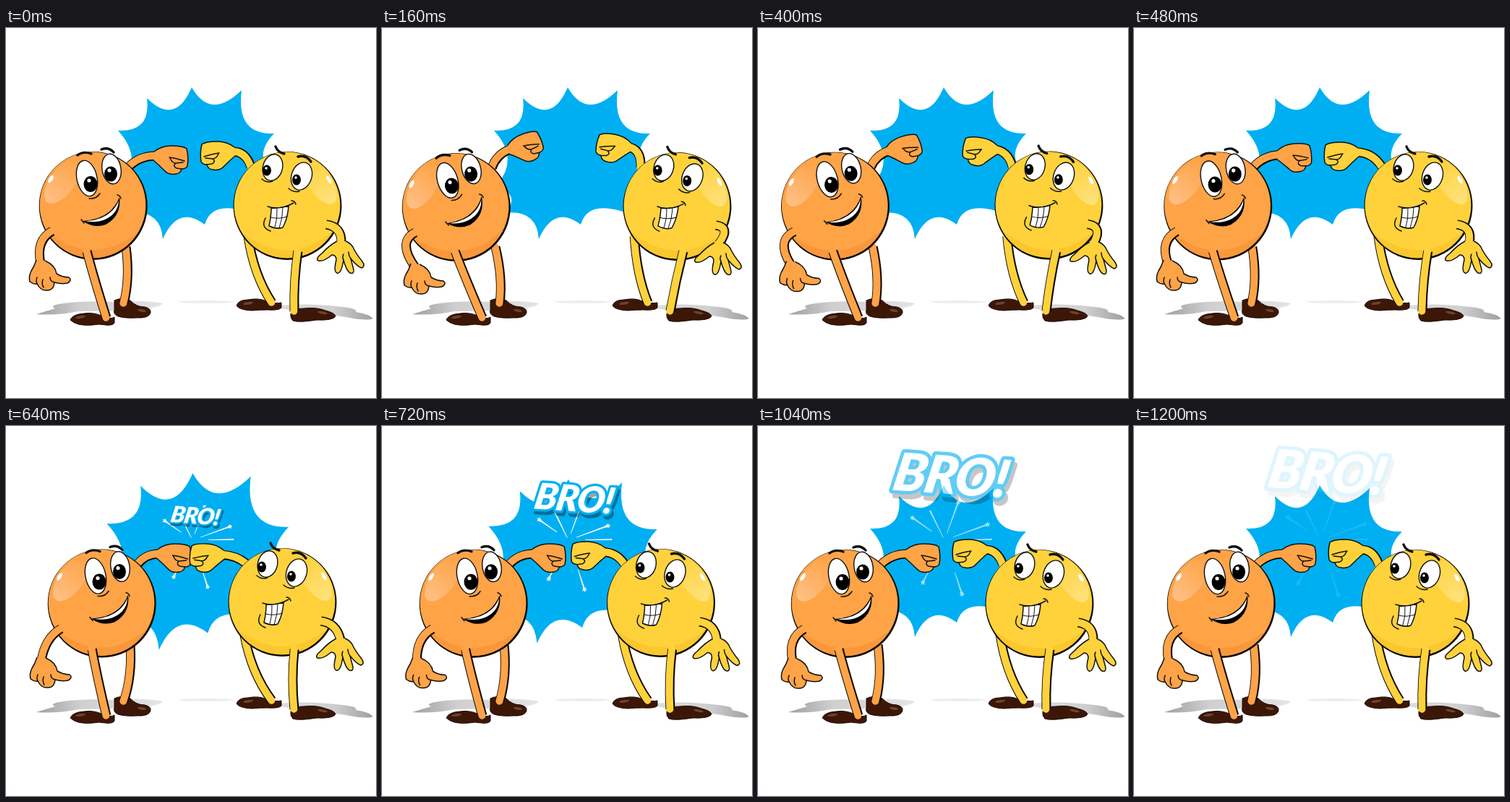
Write an HTML page that moves like this. It is 512 px wide and 512 px high and loops after 1.28 s.

```html
<!DOCTYPE html>
<html lang="en">
<head>
<meta charset="utf-8">
<title>Fist bump</title>
<style>
html, body { margin: 0; width: 100%; height: 100%; overflow: hidden; background: #fff; }
svg { display: block; width: 100vw; height: 100vh; }
.line { fill: none; stroke: #111; stroke-width: 1.5; stroke-linecap: round; stroke-linejoin: round; }
.ink { fill: none; stroke: #0d0905; stroke-width: 13; }
.tone { fill: none; stroke-width: 10; stroke-linecap: round; }
.skin { stroke: #111; stroke-width: 1.5; stroke-linejoin: round; }
.eye { fill: #fff; stroke: #111; stroke-width: 1.4; }
.shoe { fill: #3c1708; stroke: #1c0a03; stroke-width: 1; }
.shine { fill: #71432c; }
.brow { fill: none; stroke: #111; stroke-width: 3.4; stroke-linecap: round; }
#orange .skin { fill: #ffa347; }
#orange .tone { stroke: #ffa347; }
#yellow .skin { fill: #ffd23b; }
#yellow .tone { stroke: #ffd23b; }
#word text { font: italic 900 68px Lato, "Open Sans", sans-serif; letter-spacing: -2px; text-anchor: middle; stroke-linejoin: round; }
</style>
</head>
<body>
<svg viewBox="0 0 512 512">
  <defs>
    <linearGradient id="shadeL"><stop offset="0" stop-color="#9f9f9f"/><stop offset=".35" stop-color="#cfcfcf"/><stop offset="1" stop-color="#e4e4e4"/></linearGradient>
    <linearGradient id="shadeR"><stop offset="0" stop-color="#dedede"/><stop offset=".6" stop-color="#cecece"/><stop offset="1" stop-color="#9f9f9f"/></linearGradient>
    <linearGradient id="glowO"><stop offset="0" stop-color="#ffc085"/><stop offset="1" stop-color="#ffa347"/></linearGradient>
    <linearGradient id="glowY"><stop offset="0" stop-color="#ffd23b"/><stop offset="1" stop-color="#ffe27f"/></linearGradient>
  </defs>

  <path fill="url(#shadeL)" d="M42 396Q58 391 68 388Q58 384 80 381Q112 377 150 379Q195 376 217 381Q214 386 195 388Q150 392 100 392Q72 398 42 396Z"/>
  <ellipse cx="277" cy="379" rx="39" ry="2" fill="#ededed"/>
  <path fill="url(#shadeR)" d="M376 384Q420 380 465 386Q487 388 484 393Q503 396 508 402Q500 406 470 400Q430 394 376 388Z"/>

  <path id="burst" fill="#00aff2" d="M155 142Q201 144 195 97Q234 136 257 82Q283 128 326 86Q318 148 371 146Q340 178 372 205Q330 225 342 257Q285 236 275 272Q238 244 217 292Q214 250 168 256Q194 236 160 216Q190 180 155 142Z"/>
  <g id="sparks" fill="#fff"></g>

  <g id="orange">
    <path class="shoe" d="M150 377Q160 372 172 377Q180 386 192 386Q201 388 200 394Q198 402 180 401Q165 402 155 399Q148 396 150 390Z"/>
    <ellipse class="shine" cx="188" cy="391" rx="6" ry="1.8" transform="rotate(10 188 391)"/>
    <path class="shoe" d="M89 404Q92 396 108 395Q120 393 132 398Q145 404 150 400V408Q148 412 138 411Q128 409 120 411Q98 413 89 404Z"/>
    <ellipse class="shine" cx="103" cy="400" rx="7" ry="1.8" transform="rotate(-9 103 400)"/>
    <g class="limb back"></g>
    <g class="limb reach"></g>
    <g class="fist"></g>
    <g class="body">
      <circle cx=".7" cy="1" r="75" fill="#0d0905"/>
      <circle r="73.4" fill="#ffa347"/>
      <path fill="#f9973c" d="M-62 38Q0 86 62 38Q40 73 0 73Q-40 73 -62 38Z"/>
      <ellipse cx="-42" cy="-32" rx="35" ry="17" transform="rotate(-53 -42 -32)" fill="url(#glowO)"/>
      <ellipse cx="-58" cy="-36" rx="6" ry="2.6" transform="rotate(-58 -58 -36)" fill="#fff"/>
      <ellipse class="eye" cx="-8" cy="-37" rx="14" ry="25" transform="rotate(-12 -8 -37)"/>
      <ellipse class="eye" cx="26" cy="-50" rx="13" ry="21" transform="rotate(-10 26 -50)"/>
      <ellipse cx="-3" cy="-29" rx="9.5" ry="11"/>
      <ellipse cx="25" cy="-43" rx="9" ry="10.5"/>
      <circle cx="-5" cy="-34" r="2.6" fill="#fff"/>
      <circle cx="23" cy="-48" r="2.6" fill="#fff"/>
      <path class="line" d="M-5 -9Q5 -8 10 -16M-16 20L-12 25M34 -14Q38 -13 39 -9"/>
      <path class="brow" d="M-21 -69Q-13 -75 -2 -71M12 -77Q22 -81 29 -73"/>
      <path d="M-14 22Q25 20 37 -11Q40 15 18 27Q2 33 -14 22Z"/>
      <path fill="#fff" d="M-10 22.500Q25 20 36 -6Q35 12 17 20Q5 25 -10 22.500Z"/>
    </g>
    <g class="limb front"></g>
    <g class="limb rest"></g>
    <g class="hand">
      <path class="skin" d="M42 321Q39 330 35 336Q31 344 33 351Q38 355 43 354Q48 364 57 363Q66 363 67 352Q77 355 85 353Q92 349 87 345Q78 345 70 340Q68 328 54 322"/>
      <path class="line" d="M43 354Q41 350 43 345M52 359Q49 354 51 348M67 352Q61 351 61 345"/>
    </g>
  </g>

  <g id="yellow">
    <path class="shoe" d="M319 384Q322 376 335 376Q350 373 360 378Q375 382 381 380V387Q378 391 362 390Q350 390 340 391Q322 390 319 384Z"/>
    <ellipse class="shine" cx="335" cy="381" rx="7" ry="1.8" transform="rotate(-8 335 381)"/>
    <path class="shoe" d="M394 395Q398 388 412 388Q430 386 442 391Q455 394 456 399Q452 405 430 404Q405 408 397 405Q393 401 394 395Z"/>
    <ellipse class="shine" cx="438" cy="394" rx="7" ry="1.8" transform="rotate(12 438 394)"/>
    <g class="limb back"></g>
    <g class="limb reach"></g>
    <g class="fist"></g>
    <g class="body">
      <circle cx=".5" cy="1" r="75" fill="#0d0905"/>
      <circle r="73.400" fill="#ffd23b"/>
      <path fill="#fac72f" d="M-62 38Q0 86 62 38Q40 73 0 73Q-40 73 -62 38Z"/>
      <ellipse cx="46" cy="-31" rx="34" ry="16" transform="rotate(57 46 -31)" fill="url(#glowY)"/>
      <ellipse cx="58" cy="-35" rx="6" ry="2.400" transform="rotate(60 58 -35)" fill="#fff"/>
      <ellipse class="eye" cx="-20" cy="-52" rx="13.500" ry="18.500" transform="rotate(15 -20 -52)"/>
      <ellipse class="eye" cx="20" cy="-40" rx="14" ry="19.500" transform="rotate(18 20 -40)"/>
      <ellipse cx="-28" cy="-48" rx="6" ry="7.500"/>
      <ellipse cx="13" cy="-35" rx="6" ry="7.500"/>
      <circle cx="-29" cy="-51" r="1.800" fill="#fff"/>
      <circle cx="12" cy="-38" r="1.800" fill="#fff"/>
      <path class="line" d="M-35 -36Q-28 -30 -20 -33M2 -23Q9 -17 17 -19M-30 18Q-37 31 -23 36"/>
      <path class="brow" d="M-16 -81Q-13 -73 -4 -71M15 -67Q26 -70 33 -60"/>
      <path class="line" d="M-27 2Q-10 8 9 -3M6 -6Q11 -6 12 -1"/>
      <path fill="#fff" stroke="#111" stroke-width="1.500" stroke-linejoin="round" d="M-22 4Q-10 5 2 1Q1 18 -6 31Q-14 34 -25 29Q-22 17 -22 4Z"/>
      <path class="line" style="stroke-width:1" d="M-14 5Q-13 18 -17 31M-6 4Q-6 18 -11 32M-23 17Q-11 20 0 16"/>
    </g>
    <g class="limb front"></g>
    <g class="limb rest"></g>
    <g class="hand">
      <path class="skin" d="M458 295Q447 301 437 312Q428 319 432 322Q439 324 451 314Q457 314 457 321Q453 337 458 339Q464 341 467 321Q471 336 476 339Q482 341 481 334L477 319Q486 330 492 332Q498 330 493 323Q484 312 480 303Q476 297 470 295"/>
      <path class="line" d="M467 321Q465 317 467 313M477 319Q474 315 474 310"/>
    </g>
  </g>

  <g id="word">
    <text x="5" y="31" opacity=".36" stroke="#000" stroke-width="8">BRO!</text>
    <text y="24.500" fill="#fff" stroke="#00aff2" stroke-width="9" paint-order="stroke">BRO!</text>
  </g>
</svg>
<script>
const STEP = 80, COUNT = 16;
const $ = (sel, root = document) => root.querySelector(sel);
const set = (el, name, value) => el.setAttribute(name, value);

// body x, y, turn; fist x, y, turn; resting hand dx, dy; one row per two steps
const poses = {
  orange: [
    [120, 245, 0, 229, 183, 0, 0, 0],
    [102, 247, -5, 200, 166, -20, -2, 5],
    [97, 246, -6, 185, 159, -30, -4, 3],
    [115.5, 245.5, -1, 223, 180, -4, -1, 0],
    [132, 244.5, 0, 233.5, 183, 0, 1, -1]
  ],
  yellow: [
    [389, 245, 0, 292, 177, 0, 0, 0],
    [408, 246, 2, 319, 167, 10, 2, 2],
    [411, 244, 3, 326, 165, 15, 2, 2],
    [393, 245, 0, 286, 178, 0, 0, 0],
    [382, 243, 0, 277, 183, 3, -1, -1]
  ]
};
const swell = { 7: 1.05, 8: 1.165, 9: 1.08 };
// step: word x, y, scale, opacity, spark scale
const pops = {
  8: [262, 124, .46, 1, .92],
  9: [266, 100, .74, 1, .97],
  10: [267, 77, 1, 1, 1],
  11: [267, 73, 1.03, 1, 1.02],
  12: [267, 70, 1.05, .85, 1.04],
  13: [267, 68, 1.07, .62, 1.06],
  14: [267, 66, 1.08, .37, 1.07],
  15: [267, 64, 1.09, .12, 1.08]
};
// angle, inner and outer radius, star at the tip
const rays = [
  [-145, 20, 51, 1], [-116, 4, 43, 0], [-70, 10, 53, 1], [-20, 12, 60, 1],
  [-1, 24, 62, 0], [117, 46, 62, 1], [72, 44, 74, 1]
];

const fistArt = `<path class="skin" d="M-24 -12Q-14 -20 0 -20Q16 -20 21 -16Q24 -4 22 8Q20 12 14 12Q13 18 6 19Q-4 21 -10 14Q-18 6 -25 0"/>
  <path class="line" d="M-3 -4Q6 -3 18 1M-2 -3Q1 4 6 4L16 3M6 4Q1 8 7 11L14 12"/>`;
document.querySelectorAll(".fist").forEach(g => g.innerHTML = fistArt);
document.querySelectorAll(".limb").forEach(g =>
  g.innerHTML = '<path class="ink"/><path class="tone" transform="translate(-.6 -.3)"/>');

function star(x, y, r) {
  const pts = [...Array(10).keys()].map(i => {
    const a = i * Math.PI / 5 - 1.2, q = i % 2 ? r * .45 : r;
    return `${x + q * Math.cos(a)},${y + q * Math.sin(a)}`;
  });
  return `<polygon points="${pts.join(" ")}"/>`;
}
$("#sparks").innerHTML = rays.map(([deg, a, b, tip]) =>
  `<g transform="rotate(${deg})"><path d="M${a} -.4L${b} -1.1V1.1L${a} .4Z"/>${tip ? star(b, 0, 4) : ""}</g>`).join("");

function poseAt(rows, step) {
  const row = i => rows[i] || rows[0];
  const i = step >> 1, k = step % 2 / 2;
  return row(i).map((v, n) => v + (row(i + 1)[n] - v) * k);
}

function limb(root, name, from, bend, to) {
  const d = `M${from}Q${bend}  ${to}`;
  for (const path of $(".limb." + name, root).children) set(path, "d", d);
}

function drawPal(id, step) {
  const root = $("#" + id), left = id === "orange", side = left ? 1 : -1;
  const [x, y, turn, fx, fy, ft, hx, hy] = poseAt(poses[id], step);
  set($(".body", root), "transform", `translate(${x} ${y}) rotate(${turn})`);
  set($(".fist", root), "transform", `translate(${fx} ${fy}) rotate(${ft}) scale(${side} 1)`);
  set($(".hand", root), "transform", `translate(${hx} ${hy})`);

  const a = ft * Math.PI / 180, c = Math.cos(a), s = Math.sin(a);
  const wx = fx - 22 * side * c + 6 * s, wy = fy - 22 * side * s - 6 * c;
  const sx = x + 50 * side, sy = y - 53;
  const reach = Math.hypot(wx - sx, wy - sy) * .55 * side;
  limb(root, "reach", [sx, sy], [wx - reach * c, wy - reach * s], [wx, wy]);

  if (left) {
    const d = x - 120;
    limb(root, "back", [166 + d * .5, 303], [172 + d * .25, 346], [163, 381]);
    limb(root, "front", [112 + d * .6, 309], [122 + d * .35, 347], [139, 401]);
    limb(root, "rest", [x - 56, y + 36], [x - 79 + hx, y + 49], [48 + hx, 326 + hy]);
  } else {
    const d = x - 389;
    limb(root, "back", [335 + d * .75, 288], [343 + d * .5, 342], [368, 380]);
    limb(root, "front", [404 + d * .68, 309], [398 + d * .45, 350], [399, 392]);
    limb(root, "rest", [x + 54, y + 27], [x + 76, y + 30], [464 + hx, 297 + hy]);
  }
}

function draw(step) {
  drawPal("orange", step);
  drawPal("yellow", step);
  set($("#burst"), "transform", `translate(249 184) scale(${swell[step] || 1}) translate(-249 -184)`);
  const [x, y, size, alpha, spread] = pops[step] || [0, 0, 1, 0, 1];
  set($("#word"), "transform", `translate(${x} ${y}) scale(${size}) rotate(4) skewX(-7)`);
  set($("#word"), "opacity", alpha);
  set($("#sparks"), "transform", `translate(258 158) scale(${spread})`);
  set($("#sparks"), "opacity", alpha);
}

let shown = -1;
const start = performance.now();
function tick() {
  const step = Math.floor((performance.now() - start) / STEP) % COUNT;
  if (step !== shown) draw(shown = step);
  requestAnimationFrame(tick);
}
tick();
</script>
</body>
</html>
```
